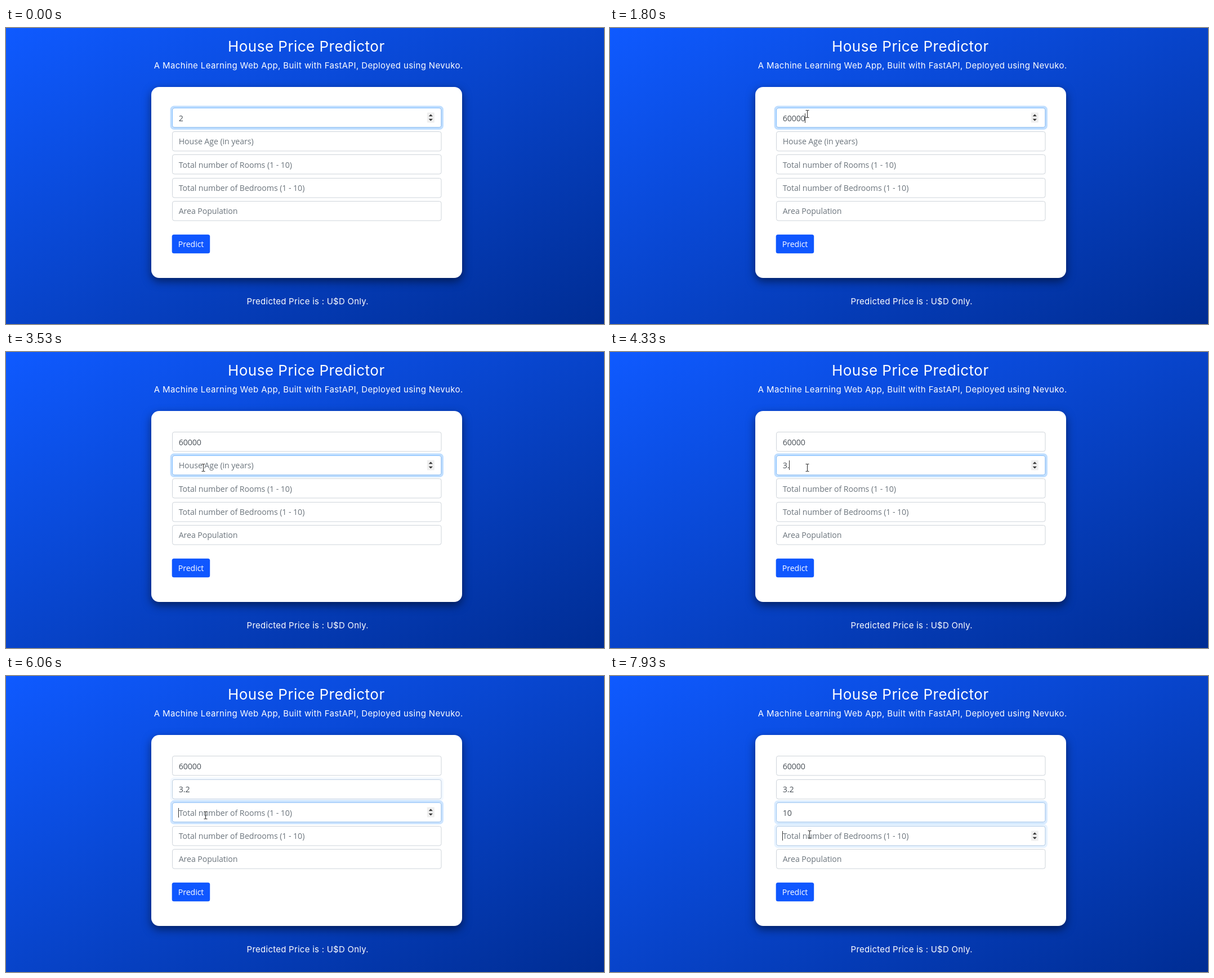
An HTML page for the animation above (8 s loop, 1062 px wide and 527 px high).

```html
<!DOCTYPE html>
<html lang="en">
<head>
<meta charset="utf-8">
<title>House Price Predictor</title>
<style>
html, body { margin: 0; width: 100%; height: 100%; overflow: hidden; }
body { background: linear-gradient(to bottom right, #0f5aff, #002d94); }
.card {
  position: absolute; left: 258px; top: 105px; width: 552px; height: 340px;
  border-radius: 14px; background: #fff; box-shadow: 0 6px 16px rgba(0, 0, 0, .5);
}
svg { position: absolute; left: 0; top: 0; width: 1062px; height: 527px; }
.head { font-family: Inter, sans-serif; fill: #fff; }
.title { font-size: 26px; letter-spacing: .48px; }
.sub { font-size: 15px; letter-spacing: .37px; }
.foot { font-size: 15px; letter-spacing: .25px; }
.body { font-family: "Open Sans", "Noto Sans", sans-serif; font-size: 14.2px; letter-spacing: -.08px; }
.box { fill: #fff; stroke: #ced4da; }
.glow { fill: none; stroke: #80bdff; }
.ring { fill: none; stroke: #007bff; stroke-opacity: .25; stroke-width: 3.4; }
.beam { fill: none; stroke: #333; stroke-width: 1.1; }
</style>
</head>
<body>
<div class="card"></div>
<svg viewBox="0 0 1062 527">
  <text class="head title" x="394" y="42">House Price Predictor</text>
  <text class="head sub" x="262.7" y="72">A Machine Learning Web App, Built with FastAPI, Deployed using Nevuko.</text>
  <text class="head foot" x="427.6" y="492">Predicted Price is : U$D Only.</text>
  <g id="form" class="body"></g>
  <rect x="294.7" y="367.8" width="67.5" height="33.4" rx="3.5" fill="#0f57ff"/>
  <text class="body" x="328.5" y="389.5" text-anchor="middle" fill="#fff">Predict</text>
  <path id="caret" d="M.5 -14V3" stroke="#333"/>
  <path id="mouse" class="beam" d="M-3 -6.5H-1L0 -5.7L1 -6.5H3M0 -5.7V5.7M-3 6.5H-1L0 5.7L1 6.5H3"/>
</svg>
<script>
const LOOP = 8000, TICK = 1000 / 15, BLINK = 530, FADE = 150;
const hints = ['', 'House Age (in years)', 'Total number of Rooms (1 - 10)',
  'Total number of Bedrooms (1 - 10)', 'Area Population'];

// [time, field]
const clicks = [[-999, 0], [2990, 1], [5960, 2], [7870, 3]];
// [time, field, value]
const keys = [
  [-999, 0, '2'], [400, 0, '6'], [730, 0, '60'], [1000, 0, '600'],
  [1200, 0, '6000'], [1530, 0, '60000'],
  [4100, 1, '3'], [4270, 1, '3.'], [4470, 1, '3.2'],
  [7060, 2, '1'], [7270, 2, '10']
];
// [time, x, y]
const path = [
  [270, 350.5, 153], [2700, 350.5, 153], [2930, 350.5, 206], [4950, 350.5, 206],
  [5260, 353, 258], [5500, 353, 258], [5600, 354.5, 248], [7300, 354.5, 248],
  [7530, 354.5, 282]
];

const $ = id => document.getElementById(id);
const smooth = p => p * p * (3 - 2 * p);
const clamp = v => Math.max(0, Math.min(1, v));

function add(parent, tag, attrs) {
  const el = document.createElementNS('http://www.w3.org/2000/svg', tag);
  for (const k in attrs) el.setAttribute(k, attrs[k]);
  parent.append(el);
  return el;
}

const fields = hints.map((hint, i) => {
  const g = $('form'), top = Math.round(142.3 + 41.4 * i), base = Math.round(166 + 41.3 * i);
  const frame = { x: 295.5, y: top + .5, width: 477.5, height: 34.5, rx: 3.5 };
  add(g, 'rect', { class: 'box', ...frame });
  const focus = add(g, 'g', { opacity: 0 });
  add(focus, 'rect', { class: 'ring', x: 293.3, y: top - 1.7, width: 481.9, height: 38.9, rx: 5 });
  add(focus, 'rect', { class: 'glow', ...frame });
  const text = add(g, 'text', { x: 306.7, y: base });
  const spin = add(g, 'g', { transform: `translate(754.3 ${top + 17.5})` });
  add(spin, 'rect', { x: -6.5, y: -9, width: 13, height: 18, rx: 1, fill: '#efefef' });
  add(spin, 'path', { d: 'M-3.6 -2.3L0 -6L3.6 -2.3ZM-3.6 2.3L0 6L3.6 2.3Z', fill: '#333' });
  return { hint, top, base, focus, text, spin };
});

function mouseAt(t) {
  if (t < path[0][0]) return null;
  const n = path.findIndex(p => p[0] > t);
  if (n < 0) return path[path.length - 1].slice(1);
  const [t0, x0, y0] = path[n - 1], [t1, x1, y1] = path[n];
  const p = smooth((t - t0) / (t1 - t0));
  return [x0 + (x1 - x0) * p, y0 + (y1 - y0) * p];
}

function draw(t) {
  const past = clicks.filter(c => c[0] <= t);
  const [clicked, active] = past[past.length - 1];
  const typed = keys.filter(k => k[0] <= t);
  const mouse = mouseAt(t);
  const fade = smooth(clamp((t - clicked) / FADE));

  fields.forEach((f, i) => {
    const value = typed.filter(k => k[1] === i).map(k => k[2]).pop() || '';
    f.text.textContent = value || f.hint;
    f.text.setAttribute('fill', value ? '#495057' : '#6c757d');
    f.focus.setAttribute('opacity', i === active ? fade : i === active - 1 ? 1 - fade : 0);
    const hover = mouse && mouse[1] >= f.top && mouse[1] <= f.top + 35;
    f.spin.style.display = i === active || hover ? '' : 'none';
    f.width = value ? f.text.getComputedTextLength() : 0;
  });

  const reset = Math.max(clicked, typed[typed.length - 1][0]);
  const lit = t >= 60 && Math.floor((t - reset) / BLINK) % 2 === 0;
  const f = fields[active];
  $('caret').style.display = lit ? '' : 'none';
  $('caret').setAttribute('transform', `translate(${Math.floor(306.7 + f.width)} ${f.base})`);

  $('mouse').style.display = mouse ? '' : 'none';
  if (mouse) $('mouse').setAttribute('transform', `translate(${mouse[0]} ${mouse[1]})`);
}

const start = performance.now();
function loop() {
  const t = (performance.now() - start) % LOOP;
  draw(Math.min(LOOP / TICK - 1, Math.floor((t + 8) / TICK)) * TICK);
  requestAnimationFrame(loop);
}
loop();
</script>
</body>
</html>
```
